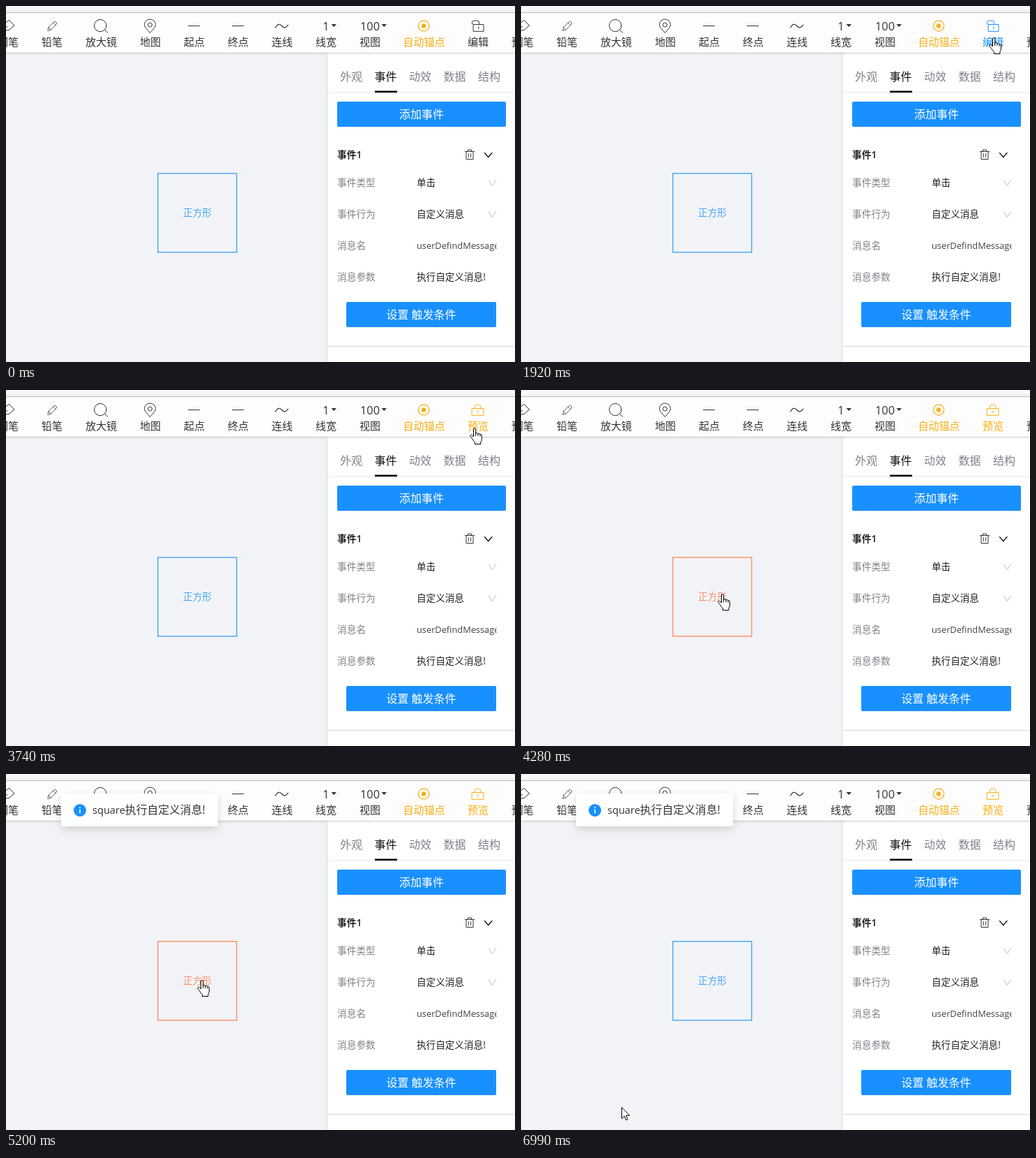
An HTML page for the animation above (8000 ms loop, 730x510 px).

```html
<!DOCTYPE html>
<html lang="zh-CN">
<head>
<meta charset="utf-8">
<style>
html, body { margin: 0; width: 100%; height: 100%; overflow: hidden; background: #f2f3f6; }
svg { display: block; }
text { font-family: "Open Sans", "Noto Sans CJK SC", "Noto Sans CJK", sans-serif; }
.icon { fill: none; stroke: #333; stroke-width: 1; stroke-linejoin: round; stroke-linecap: round; }
</style>
</head>
<body>
<svg id="stage" width="730" height="510" viewBox="0 0 730 510"></svg>
<script>
const BLUE = '#1890ff', GOLD = '#faad14', MIXED = '#899f8a', DARK = '#333', GREY = '#7d828a';
const stage = document.getElementById('stage');

// y is the middle of the line of text
const text = (x, y, s, size = 15, fill = DARK, attrs = '') =>
  `<text x="${x}" y="${y + size * .34}" font-size="${size}" fill="${fill}" ${attrs}>${s}</text>`;
const mid = 'text-anchor="middle"';
const rect = (x, y, w, h, fill, attrs = '') =>
  `<rect x="${x}" y="${y}" width="${w}" height="${h}" fill="${fill}" ${attrs}/>`;
const icon = (d, attrs = '') => `<path class="icon" d="${d}" ${attrs}/>`;
const button = (x, y, w, label) =>
  rect(x, y + 2, w, 36, '#f4f4f4', 'rx="2"') + rect(x, y, w, 36, BLUE, 'rx="2"') +
  text(x + w / 2, y + 18.5, label, 16, '#fff', mid + ' font-weight="500"');

const toolbar = () => {
  const labels = [[3, '钢笔'], [66, '铅笔'], [136.5, '放大镜'], [207, '地图'], [270, '起点'],
    [333, '终点'], [396, '连线'], [459, '线宽'], [522, '视图'], [740, '预览']];
  return rect(0, 0, 730, 4, '#fcfcfc') + rect(0, 4, 730, 5, '#f4f4f4') +
    rect(0, 10, 730, 56.5, '#fdfdfd', 'filter="url(#barShadow)"') + rect(0, 9, 730, 1, '#bdbdbd') +
    labels.map(([x, s]) => text(x, 51.5, s, 15, DARK, mid)).join('') +
    icon('M-5 36L-3 27 4 20 12 28 5 34ZM-5 36L2 29') +
    icon('M60 35L61 30.5 69 22.5Q70 21.5 71.3 22.7L72.3 23.7Q73.5 25 72.5 26L64.5 34ZM61 30.5L64.5 34M67.5 24L71 27.5',
      'style="stroke-width:.8"') +
    icon('M144 28a8.7 8.7 0 1 1-17.4 0a8.7 8.7 0 1 1 17.4 0M141.5 34L146 38.3') +
    icon('M206.5 38Q198.5 31 198.5 26.5A8 7.5 0 0 1 214.5 26.5Q214.5 31 206.5 38ZM209.5 27a3 3 0 1 1-6 0a3 3 0 1 1 6 0') +
    icon('M261.5 28.5H277.5M324.5 28.5H340.5M386.5 31Q390.5 23 395.5 28.5T404.5 27', 'style="stroke-width:1.2"') +
    text(459, 29, '1', 16.3, DARK, mid) + text(522, 29, '100', 16.3, DARK, mid) +
    `<path d="M466.5 26H474L470.2 30ZM538.5 26H546L542.2 30Z" fill="${DARK}"/>` +
    `<circle cx="599" cy="28.5" r="7.7" fill="none" stroke="${GOLD}" stroke-width="1.2"/>` +
    `<circle cx="599" cy="28.5" r="3.2" fill="${GOLD}"/>` +
    text(599.5, 51.5, '自动锚点', 15, GOLD, mid);
};

const panel = () => {
  const tabs = ['外观', '事件', '动效', '数据', '结构'];
  const rows = [['事件类型', '单击'], ['事件行为', '自定义消息'], ['消息名', ''], ['消息参数', '执行自定义消息!']];
  return rect(460, 60, 270, 450, '#d8dade') + rect(461, 60, 269, 450, '#fff') +
    tabs.map((s, i) => text(495 + i * 49.5, 101.5, s, 16, i == 1 ? '#111' : GREY,
      mid + (i == 1 ? ' font-weight="500"' : ''))).join('') +
    rect(461, 123.5, 269, 1, '#e6e7ea') + rect(529, 121.5, 32, 2.5, '#000') +
    button(475, 137, 242, '添加事件') +
    text(475, 213.5, '事件1', 13.7, '#222', 'font-weight="600"') +
    icon('M658.5 208.5H671.5M662.5 208.5V206H667.5V208.5M660 208.5V219.5H670V208.5M663.3 211.5V216.5M666.7 211.5V216.5') +
    icon('M686.5 210.5L691.7 216.5 697 210.5', 'style="stroke:#111;stroke-width:1.3"') +
    rows.map(([name, value], i) => text(475, 253.5 + i * 45, name, 13.7, GREY) +
      text(589, 253.5 + i * 45, value, 13.6, '#222')).join('') +
    `<g clip-path="url(#field)">${text(589, 343.5, 'userDefindMessage', 12.8, '#444')}</g>` +
    [250, 295].map(y => icon(`M692.5 ${y}L697.5 ${y + 7.5} 702.5 ${y}`, 'style="stroke:#bbb"')).join('') +
    button(488, 424, 215, '设置 触发条件') +
    rect(461, 487, 269, 1, '#d8dade');
};

stage.innerHTML = `<defs>
  <filter id="barShadow" x="-5%" y="-20%" width="110%" height="150%"><feDropShadow dx="0" dy="1" stdDeviation="1.5" flood-opacity=".25"/></filter>
  <filter id="toastShadow" x="-10%" y="-50%" width="120%" height="200%"><feDropShadow dx="0" dy="4" stdDeviation="6" flood-opacity=".15"/></filter>
  <clipPath id="field"><rect x="585" y="330" width="118.5" height="26"/></clipPath></defs>
  ${rect(0, 0, 730, 510, '#f2f3f6')}
  <g id="square"><rect x="217.8" y="239.8" width="113" height="113" fill="none" stroke="currentColor" stroke-width="1.4"/>
  ${text(274.5, 296.5, '正方形', 13.7, 'currentColor', mid)}</g>
  ${panel()}${toolbar()}
  <g id="mode">${text(677, 51.5, '编辑', 15, 'currentColor', mid + ' id="modeLabel"')}
    <path id="lock" class="icon" style="stroke:currentColor"/></g>
  <g id="toast">${rect(79, 28, 225, 47, '#fff', 'rx="2" filter="url(#toastShadow)"')}
    <circle cx="106" cy="52" r="9" fill="${BLUE}"/>
    ${rect(105.2, 50.5, 1.6, 6, '#fff')}${rect(105.2, 47, 1.6, 1.8, '#fff')}
    ${text(124, 52, '<tspan font-size="14.6">square</tspan>执行自定义消息!', 15.8)}</g>
  <g id="cursor" fill="#fff" stroke="#000" stroke-linejoin="round">
    <path id="arrow" d="M.5.7V16.5L4.2 13 6.8 18.8 9 17.9 6.5 12.2H11.7Z"/>
    <path id="hand" transform="translate(-7 0)" d="M5.5 13V2.1a1.6 1.6 0 0 1 3.2 0V8.5q.2-1.2 1.6-1 1.6.1 1.7 1.7 .3-1.1 1.6-.8 1.4.2 1.5 1.7 .3-.8 1.3-.5 1 .3 1 1.8V16q0 2.5-1.5 4.5V23.5H7.5V21Q5 18.5 3.5 15.5L1.2 12.6Q.2 11 1.6 10.4 2.6 10 3.8 11.2ZM8.7 8V12M12 9V12M15.1 10V12.5"/></g>`;

const el = Object.fromEntries([...stage.querySelectorAll('[id]')].map(e => [e.id, e]));
const BODY = 'M668.5 26.5H685V36.3H668.5ZM676.8 29.5V32.5';
const OPEN = 'M670.5 26.5H685V36.3H670.5ZM677.8 29.5V32.5M668.5 26V23.5Q668.5 21 671 21H676Q678.5 21 678.5 23.5V26.5';
const CLOSED = BODY + 'M672.5 26.5V24.5Q672.5 21 676.8 21T681 24.5V26.5';

// start, end, stops, from x, y, to x, y
const moves = [
  [500, 755, 4, 722, 477, 709, 392],
  [1160, 1920, 11, 717, 149, 678, 45],
  [3740, 4280, 8, 672, 54, 289, 292],
  [4360, 4430, 2, 285, 294, 283, 294],
  [4890, 5200, 5, 282, 295, 281, 295],
  [6760, 6990, 4, 266, 328, 144, 477]];

const stepped = (t, start, end, stops) =>
  Math.min(stops - 1, Math.floor((t - start) / (end - start) * (stops - 1) + .1)) / (stops - 1);
const inside = (p, x0, y0, x1, y1) => p.x >= x0 && p.x <= x1 && p.y >= y0 && p.y <= y1;

function pointer(t) {
  const move = moves.filter(m => t >= m[0]).pop();
  if (!move || t >= 840 && t < 1160) return { x: -50, y: -50 };
  const [start, end, stops, x0, y0, x1, y1] = move;
  const u = stepped(t, start, end, stops), e = u * (2 - u);
  return { x: Math.round(x0 + (x1 - x0) * e), y: Math.round(y0 + (y1 - y0) * e) };
}

function draw(t) {
  const p = pointer(t);
  const onSquare = inside(p, 217, 239, 331, 353), onMode = inside(p, 652, 10, 702, 66);
  const onButton = inside(p, 475, 137, 718, 173);
  const hand = onSquare || onMode || onButton;
  el.cursor.setAttribute('transform', `translate(${p.x} ${p.y})`);
  el.hand.style.display = hand ? '' : 'none';
  el.arrow.style.display = hand ? 'none' : '';

  el.square.style.color = onSquare ? '#fb8f6b' : '#45a5f8';
  el.mode.style.color = t >= 3330 ? GOLD : t >= 3260 ? MIXED : onMode ? BLUE : DARK;
  el.modeLabel.textContent = t < 3110 ? '编辑' : '预览';
  el.lock.setAttribute('d', t < 3260 ? OPEN : CLOSED);

  const shown = t < 4890 ? 0 : .2 + .8 * stepped(t, 4890, 5200, 5);
  el.toast.setAttribute('opacity', shown);
  el.toast.setAttribute('transform', `translate(0 ${-8 * (1 - shown)})`);
}

const origin = performance.now();
function loop() {
  draw((performance.now() - origin) % 8000);
  requestAnimationFrame(loop);
}
loop();
</script>
</body>
</html>
```
